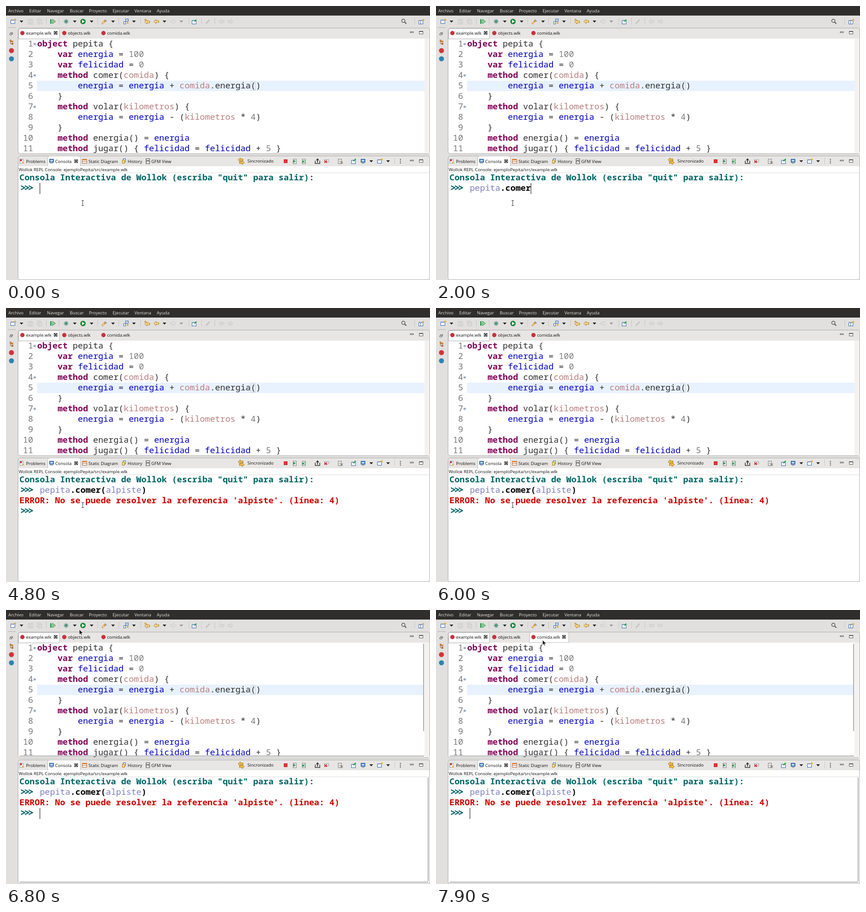
An HTML page with a canvas that plays this animation: 931 px wide and 602 px high, repeating every 8000 ms.

```html
<!DOCTYPE html>
<html lang="es">
<head>
<meta charset="utf-8">
<title>Consola interactiva</title>
<style>
html, body { margin: 0; width: 100%; height: 100%; overflow: hidden; background: #e1e0df; }
canvas { display: block; width: 931px; height: 602px; }
</style>
</head>
<body>
<canvas id="stage" width="931" height="602"></canvas>
<script>
const c = document.getElementById('stage').getContext('2d');
const LOOP = 8000, COL = 11.16, ROW = 23;
const UI = '9.65px "Open Sans", "Noto Sans", sans-serif';
const MONO = '"Noto Sans Mono", "DejaVu Sans Mono", monospace';
const BLUE = '#3465a4', GREEN = '#2e9b4f', GOLD = '#e0b040', DARK = '#333', OFF = '#c6c5c4';

const CODE = [
  'object pepita {',
  '    var energia = 100',
  '    var felicidad = 0',
  '    method comer(comida) {',
  '        energia = energia + comida.energia()',
  '    }',
  '    method volar(kilometros) {',
  '        energia = energia - (kilometros * 4)',
  '    }',
  '    method energia() = energia',
  '    method jugar() { felicidad = felicidad + 5 }'
];
const TOKEN = /\b(object|var|method)\b|(?<!\.)\b(energia|felicidad)\b(?!\()|\b(comida|kilometros)\b|\b(\d+)\b|[^\s\w]+|\w+/g;
const INPUT = 'pepita.comer(alpiste)';

// [time, characters typed]
const TYPED = [[0, 0], [500, 1], [900, 2], [1000, 3], [1200, 4], [1300, 5], [1400, 6], [1500, 7],
  [1700, 8], [1800, 9], [1900, 11], [2000, 12], [2200, 13], [2400, 14], [2900, 19], [3100, 20], [3600, 21]];
// [time, x, y] of the pointer
const MOUSE = [[0, 168, 433], [6200, 169, 360], [6300, 171, 225], [6400, 172, 116], [6500, 170, 82],
  [6600, 166, 60], [6700, 162, 46], [6800, 161, 43], [7100, 178, 46], [7200, 202, 53],
  [7300, 224, 61], [7400, 236, 66], [7800, 235, 66], [7900, 234, 66]];

const at = (keys, t) => keys.filter(k => k[0] <= t).pop();

function box(x, y, w, h, fill) {
  c.fillStyle = fill;
  c.fillRect(x, y, w, h);
}
function frame(x, y, w, h, stroke, fill) {
  if (fill) box(x, y, w, h, fill);
  c.lineWidth = 1;
  c.strokeStyle = stroke;
  c.strokeRect(x + .5, y + .5, w - 1, h - 1);
}
function disc(x, y, r, fill) {
  c.fillStyle = fill;
  c.beginPath();
  c.arc(x, y, r, 0, 7);
  c.fill();
}
function trace(pts) {
  c.beginPath();
  for (let i = 0; i < pts.length; i += 2) c.lineTo(pts[i], pts[i + 1]);
}
function line(pts, color, width = 1) {
  trace(pts);
  c.strokeStyle = color;
  c.lineWidth = width;
  c.stroke();
}
function poly(pts, fill, stroke) {
  trace(pts);
  c.closePath();
  c.fillStyle = fill;
  c.fill();
  if (stroke) {
    c.strokeStyle = stroke;
    c.lineWidth = 1;
    c.stroke();
  }
}
function label(s, x, y, color = '#111') {
  c.font = UI;
  c.fillStyle = color;
  c.fillText(s, x, y);
}
function mono(s, x, y, color, bold, size = 18.6) {
  c.font = `${bold ? 'bold' : 'normal'} ${size}px ${MONO}`;
  c.fillStyle = color;
  c.fillText(s, x, y);
}

function drop(x, y, color = '#222') { poly([x - 4, y - 2, x + 4, y - 2, x, y + 2.5], color); }
function grip(x, y) { for (let i = 0; i < 7; i++) box(x, y + i * 2, 1, 1, '#aaa'); }
function cross(x, y, r, color, w = 1.3) {
  line([x - r, y - r, x + r, y + r], color, w);
  line([x + r, y - r, x - r, y + r], color, w);
}
function closer(x, y) {
  frame(x - 4, y - 4, 8, 8, '#555', '#fff');
  cross(x, y, 2.6, '#222', 1.5);
}
function arrow(x, y, dir, fill, edge) {
  poly([0, 0, 5, -4.5, 5, -2, 11, -2, 11, 2, 5, 2, 5, 4.5].map((v, i) => i % 2 ? y + v : x + dir * (v - 5.5)), fill, edge);
}
function pane(x, y, accent) {
  frame(x - 5, y - 4, 10, 9, BLUE, '#fff');
  box(x - 5, y - 4, 10, 2, '#6d95c7');
  if (accent) disc(x + 5, y - 4, 2.3, accent);
}
function monitor(x, y) {
  frame(x - 5, y - 5, 10, 8, BLUE, '#b9d4f2');
  frame(x - 4, y - 4, 8, 6, '#3b6fb5');
  box(x - 3, y + 4, 6, 1, '#666');
}
function page(x, y, edge = '#777') {
  frame(x - 4, y - 5, 8, 11, edge, '#fafafa');
  for (let i = 0; i < 3; i++) box(x - 2, y - 2 + i * 2, 4, 1, '#b0b0b0');
}
function windowButtons(y) {
  frame(887, y - 2, 8, 3, '#555', '#fff');
  frame(907, y - 3, 9, 7, '#555', '#fff');
  box(907, y - 3, 9, 2, '#555');
}
function panel(x, y, w, h) {
  c.beginPath();
  c.roundRect(x + .5, y + .5, w, h, 5);
  c.fillStyle = '#fff';
  c.fill();
  c.save();
  c.clip();
  box(x, y, w, 23, '#e7e6e5');
  c.restore();
  c.strokeStyle = '#aaa9a8';
  c.lineWidth = 1;
  c.stroke();
}
function tab(x, y, w, h) {
  c.beginPath();
  c.roundRect(x + .5, y + .5, w, h + 1, [4, 4, 0, 0]);
  c.fillStyle = '#fff';
  c.fill();
  c.strokeStyle = '#bab9b8';
  c.lineWidth = 1;
  c.stroke();
}

function menuBar() {
  box(0, 0, 931, 21, '#2f2e2d');
  const items = { Archivo: 5, Editar: 51, Navegar: 90, Buscar: 140, Proyecto: 182, Ejecutar: 234, Ventana: 282, Ayuda: 331 };
  for (const s in items) label(s, items[s], 14, '#e6e2da');
}

function toolBar() {
  [88, 116, 201, 247, 295, 401, 429, 458, 897].forEach(x => grip(x, 27));
  [34, 151, 188, 235, 281, 348].forEach(x => drop(x, 34));
  drop(385, 34, '#999');
  pane(15, 34, GOLD);
  frame(48, 29, 11, 11, OFF); frame(51, 29, 5, 4, OFF); frame(51, 35, 5, 5, OFF);
  frame(68, 28, 8, 9, OFF); frame(71, 31, 8, 9, OFF, '#dddcdb');
  box(97, 29, 3, 10, GREEN);
  poly([102, 29, 102, 39, 109, 34], '#8fd09c', GREEN);
  for (let i = 0; i < 4; i++) {
    const a = i * Math.PI / 4, dx = Math.cos(a) * 5.5, dy = Math.sin(a) * 5.5;
    line([132 - dx, 34 - dy, 132 + dx, 34 + dy], '#35635c');
  }
  disc(132, 34, 3.2, '#4c9a83');
  disc(169, 34, 6, '#1d8a3c');
  poly([167, 30.5, 167, 37.5, 173, 34], '#fff');
  line([211, 39, 219, 31], '#d99a45', 4);
  line([217, 30, 221, 34], '#8a97b5', 2);
  box(212, 35, 3, 3, '#f5d9a0');
  frame(262, 28, 7, 6, BLUE, '#cfe0f5');
  frame(258, 34, 5, 6, BLUE, '#fff');
  box(265, 35, 4, 4, GOLD);
  arrow(310, 35, 1, '#f8dc83', '#a87b20');
  disc(306, 30, 2, '#d6a02c');
  arrow(330, 34, 1, '#f8dc83', '#a87b20');
  arrow(367, 34, -1, '#e4e3e2', OFF);
  pane(413, 35);
  line([414, 34, 418, 30], GREEN, 2.5);
  line([439, 39, 447, 30], OFF, 3);
  arrow(473, 34, 1, '#dddcdb', OFF);
  arrow(493, 34, -1, '#dddcdb', OFF);
  c.beginPath();
  c.arc(872.5, 32.5, 3.6, 0, 7);
  c.strokeStyle = '#555';
  c.lineWidth = 1.5;
  c.stroke();
  line([875, 35, 879, 39], '#555', 2);
  pane(911, 35, GOLD);
  box(910, 33, 1, 7, BLUE);
}

function sideBar() {
  for (let x = 4; x < 21; x += 3) box(x, 47, 2, 1, '#999');
  frame(10, 58, 5, 4, '#555', '#fff');
  frame(8, 60, 5, 4, '#555', '#fff');
  line([9.5, 75, 9.5, 83, 13, 83], '#8a6a45');
  line([9.5, 78.5, 13, 78.5], '#8a6a45');
  box(8, 74, 4, 4, '#c98742'); box(12, 76, 4, 4, '#c98742'); box(12, 81, 4, 4, '#b06c32');
  disc(12, 98, 5.5, '#d0353a');
  disc(12, 116, 5.5, '#2d83ad');
}

function scrollbars(t) {
  const a = Math.min(1, Math.max(0, (t - 6100) / 600));
  if (!a) return;
  box(917, 72, 2, 249, '#fff');
  c.globalAlpha = a;
  box(916, 74, 2, 192, '#aaa');
  box(30, 320, 888, 2, '#aaa');
  box(926, 368, 2, 228, '#aaa');
  box(30, 597, 897, 2, '#aaa');
  c.globalAlpha = 1;
}

function editor(t, mx, my) {
  panel(26, 48, 904, 276);
  tab(27, 49, 90, 22);
  box(28, 71, 902, 1, '#eeedec');
  const over = (from, to) => my >= 48 && my < 71 && mx >= from && mx < to;
  const second = over(118, 205), third = over(205, 291);
  if (second) tab(118, 48, 86, 22);
  if (third) tab(205, 48, 86, 22);
  const names = { 'example.wlk': [44, 36], 'objects.wlk': [136, 128], 'comida.wlk': [222, 214] };
  for (const s in names) {
    disc(names[s][1], 59.5, 4.7, '#c8323c');
    label(s, names[s][0], 63);
  }
  closer(109, 59);
  if (second) closer(196, 59);
  if (third) closer(281, 59);
  windowButtons(58);

  box(919, 72, 11, 252, '#f3f2f1');
  box(68, 164, t < 6200 ? 851 : 849, 23, '#e8f2fe');
  frame(537, 165, 11, 21, '#d0d0d0');
  c.save();
  c.beginPath();
  c.rect(27, 72, 892, 252);
  c.clip();
  CODE.forEach((src, i) => {
    const y = 89 + i * ROW, n = String(i + 1);
    mono(n, 59.6 - n.length * COL, y, '#787878');
    for (const m of src.matchAll(TOKEN)) {
      const color = m[1] ? '#7f0055' : m[2] ? '#0000c0' : m[3] ? '#b97f7f' : m[4] ? '#7d7d7d' : '#303030';
      mono(m[0], 68.5 + m.index * COL, y, color, m[1]);
    }
  });
  c.restore();
  [0, 3, 6].forEach(i => {
    disc(63, 83.5 + i * ROW, 3, '#c3ccd8');
    box(61, 83 + i * ROW, 4, 1, '#5f7085');
  });
}

function consoleTools() {
  frame(30, 336, 8, 10, '#8a93a5', '#fff');
  disc(33, 339, 2.2, '#cc3333');
  poly([34, 346, 40, 346, 37, 341], GOLD);
  monitor(100, 341);
  frame(167, 336, 11, 10, '#b5612a', '#fff');
  box(167, 336, 11, 3, '#d98242'); box(167, 341, 11, 1, '#b5612a');
  frame(257, 335, 6, 8, BLUE, '#fff'); frame(255, 338, 6, 8, '#a87b20', '#f5dc8f');
  frame(307, 335, 9, 12, '#444', '#fff');
  line([309.5, 344, 309.5, 338, 311.5, 341, 313.5, 338, 313.5, 344], '#333');
  arrow(515, 338, 1, '#f1bd4c', '#a87b20');
  arrow(518, 344, -1, '#f1bd4c', '#a87b20');
  label('Sincronizado', 530, 344);
  frame(610, 337, 8, 8, '#b81919', '#e33838');
  page(634, 341); poly([631, 338, 631, 344, 636, 341], GREEN);
  page(654, 341); poly([650, 339, 650, 345, 655, 342], GREEN);
  frame(653, 339, 5, 5, GREEN);
  line([679, 340, 679, 346, 689, 346, 689, 340], DARK, 1.5);
  line([684, 344, 684, 337], DARK, 1.7);
  poly([680.5, 339, 687.5, 339, 684, 334.5], DARK);
  frame(699, 337, 10, 6, '#99a', '#eee');
  cross(702, 342, 2.7, '#d22', 1.8);
  page(733, 341); cross(737, 344, 2.5, '#777');
  pane(763, 342); line([763, 341, 768, 336], GREEN, 2.5);
  monitor(784, 341); drop(802, 341);
  pane(820, 341, GOLD); drop(839, 341);
  grip(853, 334);
  [337, 341, 345].forEach(y => disc(866, y, 1.3, '#666'));
  windowButtons(340);
}

function prompt(y) {
  c.letterSpacing = '-4.7px';
  mono('>>>', 31, y + 1, '#006464', true, 22);
  c.letterSpacing = '0px';
}

function consoleView(t) {
  panel(26, 329, 904, 272);
  tab(91, 329, 72, 22);
  box(27, 352, 903, 14, '#fff');
  box(28, 366, 901, 1, '#dddcdb');
  consoleTools();
  const names = { Problems: 44, Consola: 108, 'Static Diagram': 181, History: 267, 'GFM View': 319 };
  for (const s in names) label(s, names[s], 345);
  closer(154, 341);
  label('Wollok REPL Console: ejemploPepita/src/example.wlk', 28, 363);

  mono('Consola Interactiva de Wollok (escriba "quit" para salir):', 29.5, 383, '#006464', true);
  prompt(406);
  const count = at(TYPED, t)[1];
  for (const m of INPUT.slice(0, count).matchAll(/\.\w*|[()]|\w+/g)) {
    const bold = /[.()]/.test(m[0]);
    mono(m[0], 74.2 + m.index * COL, 406, bold ? '#000' : '#7f7fbf', bold);
  }
  if (t >= 4100) {
    mono("ERROR: No se puede resolver la referencia 'alpiste'. (línea: 4)", 29.5, 429, '#cc0000', true);
    prompt(452);
  }
  caret(t, count);
}

function caret(t, count) {
  const blinkOff = t >= 4800 && Math.floor((t - 4800) / 600) % 2 === 0;
  if ((t >= 200 && t < 500) || blinkOff) return;
  if (t >= 4100) box(74, 435, 1, 24, '#000');
  else if (t >= 3900) box(30, 412, 1, 24, '#000');
  else box(Math.round(74 + count * COL), 389, 1, 24, '#000');
}

function pointer(x, y) {
  if (y > 366 || (y > 72 && y < 323)) {
    line([x - 2, y - 5.5, x + 3, y - 5.5], DARK);
    line([x + .5, y - 5, x + .5, y + 6], DARK);
    line([x - 2, y + 5.5, x + 3, y + 5.5], DARK);
  } else {
    poly([0, 0, 0, 11, 2.5, 8.7, 4.3, 12.5, 6, 11.7, 4.3, 8, 8, 8].map((v, i) => v + (i % 2 ? y : x)), '#111', 'rgba(255,255,255,.7)');
  }
}

function draw(t) {
  const [, mx, my] = at(MOUSE, t);
  box(0, 0, 931, 602, '#e1e0df');
  menuBar();
  toolBar();
  sideBar();
  editor(t, mx, my);
  consoleView(t);
  scrollbars(t);
  pointer(mx, my);
}

const start = performance.now();
function tick() {
  draw((performance.now() - start) % LOOP);
  requestAnimationFrame(tick);
}
tick();
</script>
</body>
</html>
```
